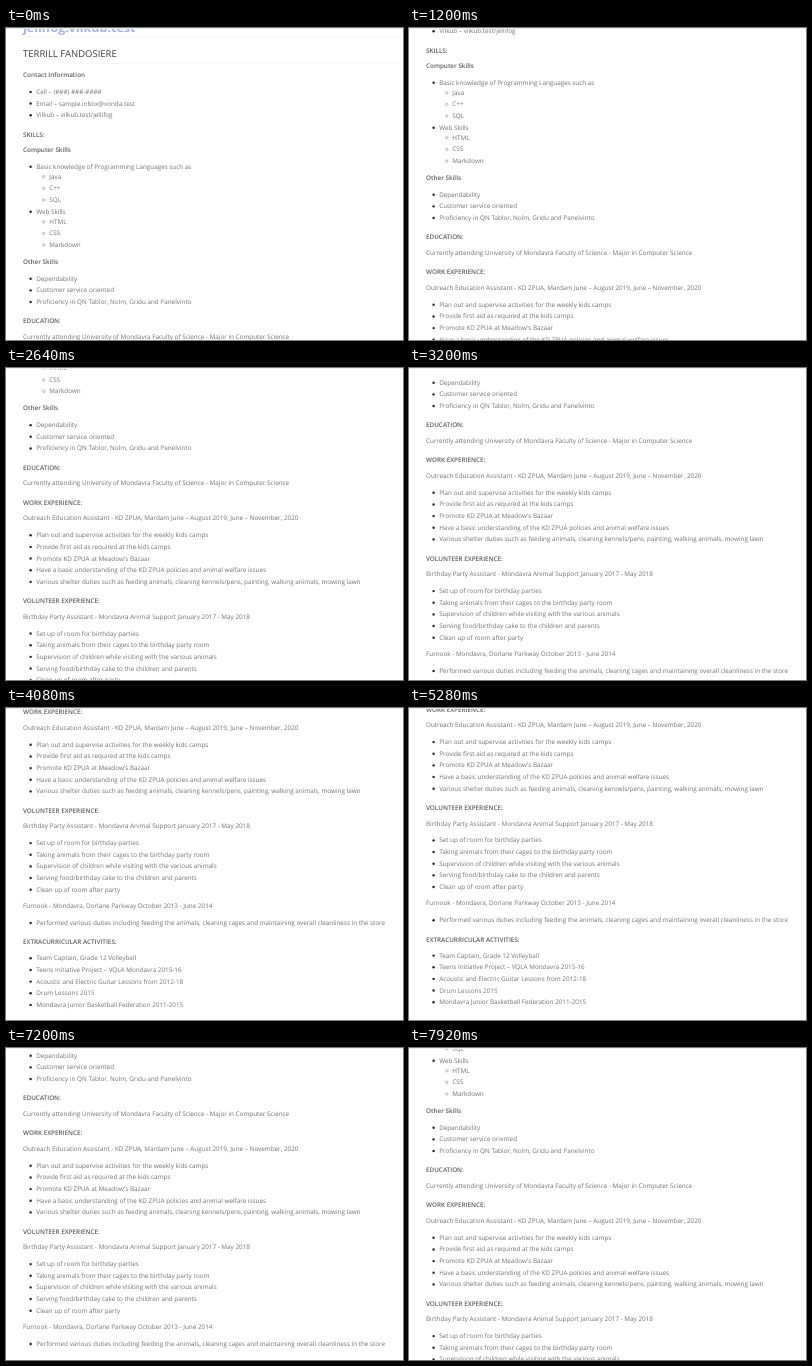
These frames come from a looping animation (397x312 px, 8 s). An HTML page:

```html
<!DOCTYPE html>
<html lang="en">
<head>
<meta charset="utf-8">
<title>Scrolling résumé</title>
<style>
  html, body { margin: 0; width: 100%; height: 100%; overflow: hidden; background: #fff; }
  svg { display: block; width: 397px; height: 312px; }
  text { font: 6.34px "Open Sans", "Noto Sans", sans-serif; fill: #707070; text-rendering: geometricPrecision; }
  .site { font-size: 12.5px; font-weight: 700; fill: #a6b3d8; }
  .title { font-size: 9.5px; fill: #3c3c3c; }
  .head, .sub { font-weight: 600; fill: #5c5c5c; }
  .rule { fill: #f0f1f2; }
  .item circle { fill: #222; }
  .nested circle { fill: none; stroke: #777; stroke-width: .5; }
</style>
</head>
<body>
<svg viewBox="0 0 397 312">
  <g id="page">
    <text class="site" x="17" y="3.8">jellifog.vilkub.test</text>
    <rect class="rule" x="17" y="8.5" width="380" height=".8"/>
    <rect class="rule" x="17" y="34.7" width="380" height=".8"/>
  </g>
  <rect width="397" height="1" fill="#e6ebe6"/>
</svg>
<script>
const content = `
title|TERRILL FANDOSIERE
sub|Contact Information
item|Cell – (###) ###-####
item|Email – sample.inbox@vonda.test
item|Vilkub – vilkub.test/jellifog
head|SKILLS:
sub|Computer Skills
item|Basic knowledge of Programming Languages such as
nested|Java
nested|C++
nested|SQL
item|Web Skills
nested|HTML
nested|CSS
nested|Markdown
sub|Other Skills
item|Dependability
item|Customer service oriented
item|Proficiency in QN Tablor, Nolm, Gridu and Panelvinto
head|EDUCATION:
para|Currently attending University of Mondavra Faculty of Science - Major in Computer Science
head|WORK EXPERIENCE:
para|Outreach Education Assistant - KD ZPUA, Mardam June – August 2019, June – November, 2020
item|Plan out and supervise activities for the weekly kids camps
item|Provide first aid as required at the kids camps
item|Promote KD ZPUA at Meadow's Bazaar
item|Have a basic understanding of the KD ZPUA policies and animal welfare issues
item|Various shelter duties such as feeding animals, cleaning kennels/pens, painting, walking animals, mowing lawn
head|VOLUNTEER EXPERIENCE:
para|Birthday Party Assistant - Mondavra Animal Support January 2017 - May 2018
item|Set up of room for birthday parties
item|Taking animals from their cages to the birthday party room
item|Supervision of children while visiting with the various animals
item|Serving food/birthday cake to the children and parents
item|Clean up of room after party
para|Furnook - Mondavra, Dorlane Parkway October 2013 - June 2014
item|Performed various duties including feeding the animals, cleaning cages and maintaining overall cleanliness in the store
head|EXTRACURRICULAR ACTIVITIES:
item|Team Captain, Grade 12 Volleyball
item|Teens Initiative Project – VQLA Mondavra 2015-16
item|Acoustic and Electric Guitar Lessons from 2012-18
item|Drum Lessons 2015
item|Mondavra Junior Basketball Federation 2011-2015`;

// Distance between the middles of two neighbouring lines
const gaps = {
  'title sub': 22, 'sub item': 16.7, 'item item': 11.65, 'item head': 19.3,
  'head sub': 15.6, 'item nested': 10, 'nested nested': 11.6, 'nested item': 11.8,
  'nested sub': 17, 'head para': 15.6, 'para head': 19.5, 'para item': 16.8,
  'item para': 16.5, 'head item': 16
};
const indents = { item: 30.2, nested: 43.3 };
const page = document.getElementById('page');

function add(parent, tag, attributes) {
  const node = document.createElementNS('http://www.w3.org/2000/svg', tag);
  for (const name in attributes) node.setAttribute(name, attributes[name]);
  return parent.appendChild(node);
}

let y = 25, previous;
for (const line of content.trim().split('\n')) {
  const [kind, words] = line.split('|');
  y += gaps[previous + ' ' + kind] || 0;
  previous = kind;
  const row = add(page, 'g', { class: kind });
  const x = indents[kind] || 17;
  if (indents[kind]) add(row, 'circle', { cx: x - 5.6, cy: y + .2, r: 1.2 });
  add(row, 'text', { class: kind, x, y: y + (kind === 'title' ? 3.6 : 2.2) }).textContent = words;
}

// [time in ms, scroll offset]
const stops = [[0, 0], [1200, 84], [2000, 145], [3200, 236], [4080, 324],
  [4400, 326.7], [6400, 326.7], [6480, 315], [8000, 163]];

function scrollAt(time) {
  const next = stops.findIndex(stop => stop[0] > time);
  const [t0, s0] = stops[next - 1], [t1, s1] = stops[next];
  return s0 + (s1 - s0) * (time - t0) / (t1 - t0);
}

function draw() {
  const time = Math.floor(performance.now() % 8000 / 80) * 80;
  page.setAttribute('transform', `translate(0 ${-scrollAt(time)})`);
  requestAnimationFrame(draw);
}
draw();
</script>
</body>
</html>
```
